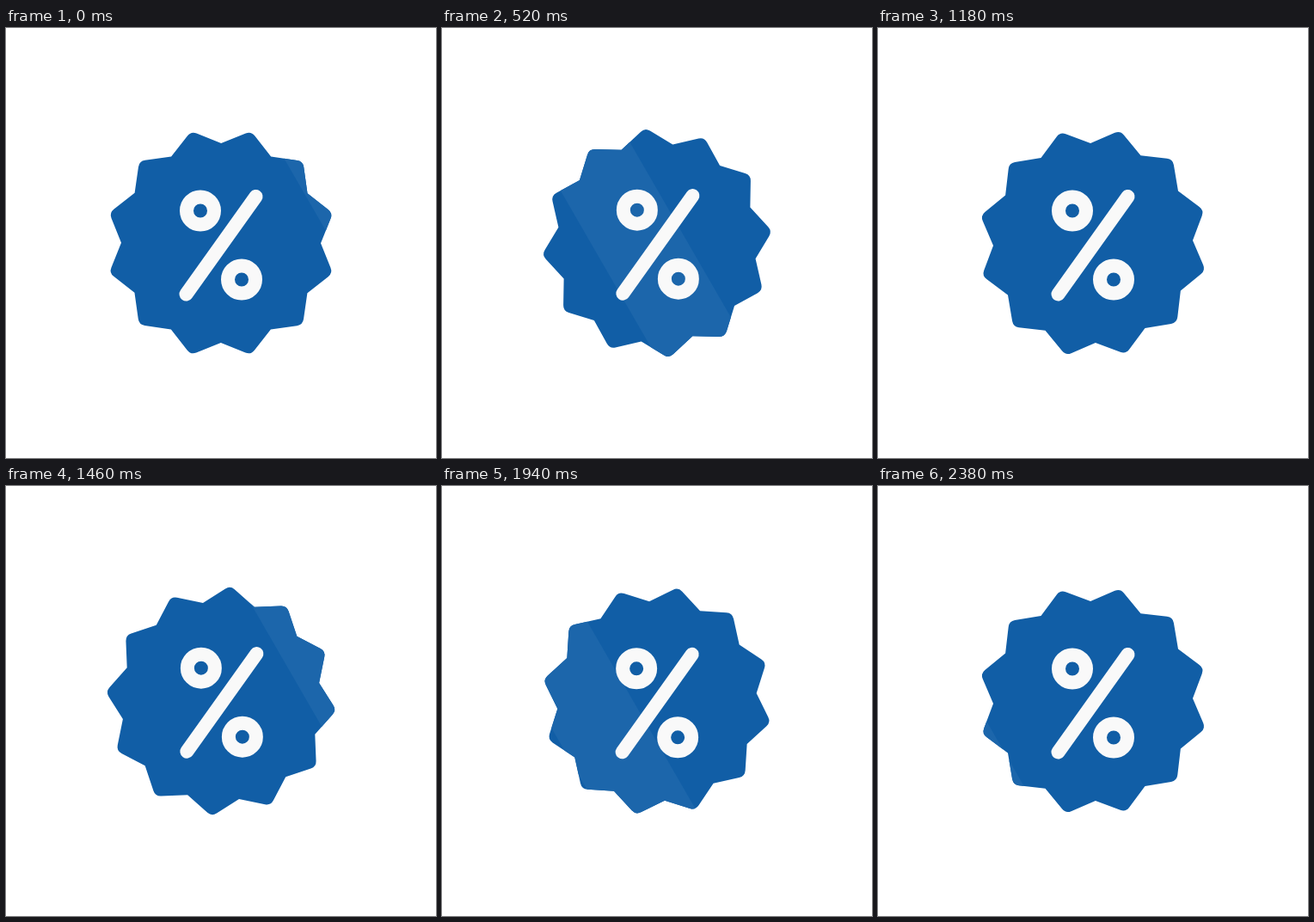
An HTML page with a canvas that plays this animation: 500x500 px, repeating every 2400 ms.

```html
<!DOCTYPE html>
<html lang="en">
<head>
<meta charset="utf-8">
<title>Discount badge</title>
<style>
  html, body { margin: 0; width: 100%; height: 100%; overflow: hidden; background: #fff; }
  canvas { display: block; }
</style>
</head>
<body>
<canvas id="stage" width="500" height="500"></canvas>
<script>
const ctx = document.getElementById('stage').getContext('2d');
const LOOP = 2400, HALF = 1200;
const POINTS = 12, TIP = 134.6, VALLEY = 116, TIP_ROUND = 9;
const SHINE_WIDTH = 98;

const polar = (radius, step) => {
  const angle = step * Math.PI / POINTS;
  return [radius * Math.sin(angle), -radius * Math.cos(angle)];
};

const badge = new Path2D();
badge.moveTo(...polar(VALLEY, 0));
for (let i = 1; i < POINTS * 2; i += 2) {
  badge.arcTo(...polar(TIP, i), ...polar(VALLEY, i + 1), TIP_ROUND);
  badge.lineTo(...polar(VALLEY, i + 1));
}
badge.closePath();

const percent = new Path2D();
percent.arc(-24, -37.5, 16, 0, Math.PI * 2);
percent.moveTo(40, 42.5);
percent.arc(24, 42.5, 16, 0, Math.PI * 2);
percent.moveTo(40.5, -54);
percent.lineTo(-40.5, 59.5);

// Centre of the shine, measured across its slanted edges
function shineCentre(t) {
  if (t < HALF) return 162 - 0.345 * t;
  return Math.max(-168, 249 - 0.4345 * (t - HALF));
}

function draw(t) {
  ctx.setTransform(1, 0, 0, 1, 0, 0);
  ctx.clearRect(0, 0, 500, 500);
  ctx.translate(250, 250);

  ctx.save();
  ctx.rotate(t / LOOP * Math.PI);
  ctx.fillStyle = '#115ea6';
  ctx.fill(badge);
  ctx.clip(badge);
  ctx.rotate(-t / LOOP * Math.PI - Math.PI / 6);
  ctx.fillStyle = '#1c66ab';
  ctx.fillRect(shineCentre(t) - SHINE_WIDTH / 2, -200, SHINE_WIDTH, 400);
  ctx.restore();

  // The sign drifts by a pixel during each sweep
  const drift = Math.sin(Math.PI * Math.min(1, t % HALF / 780));
  ctx.translate(drift, -drift);
  ctx.strokeStyle = '#f9f9f9';
  ctx.lineWidth = 16;
  ctx.lineCap = 'round';
  ctx.stroke(percent);
}

function tick() {
  draw(performance.now() % LOOP);
  requestAnimationFrame(tick);
}
tick();
</script>
</body>
</html>
```
